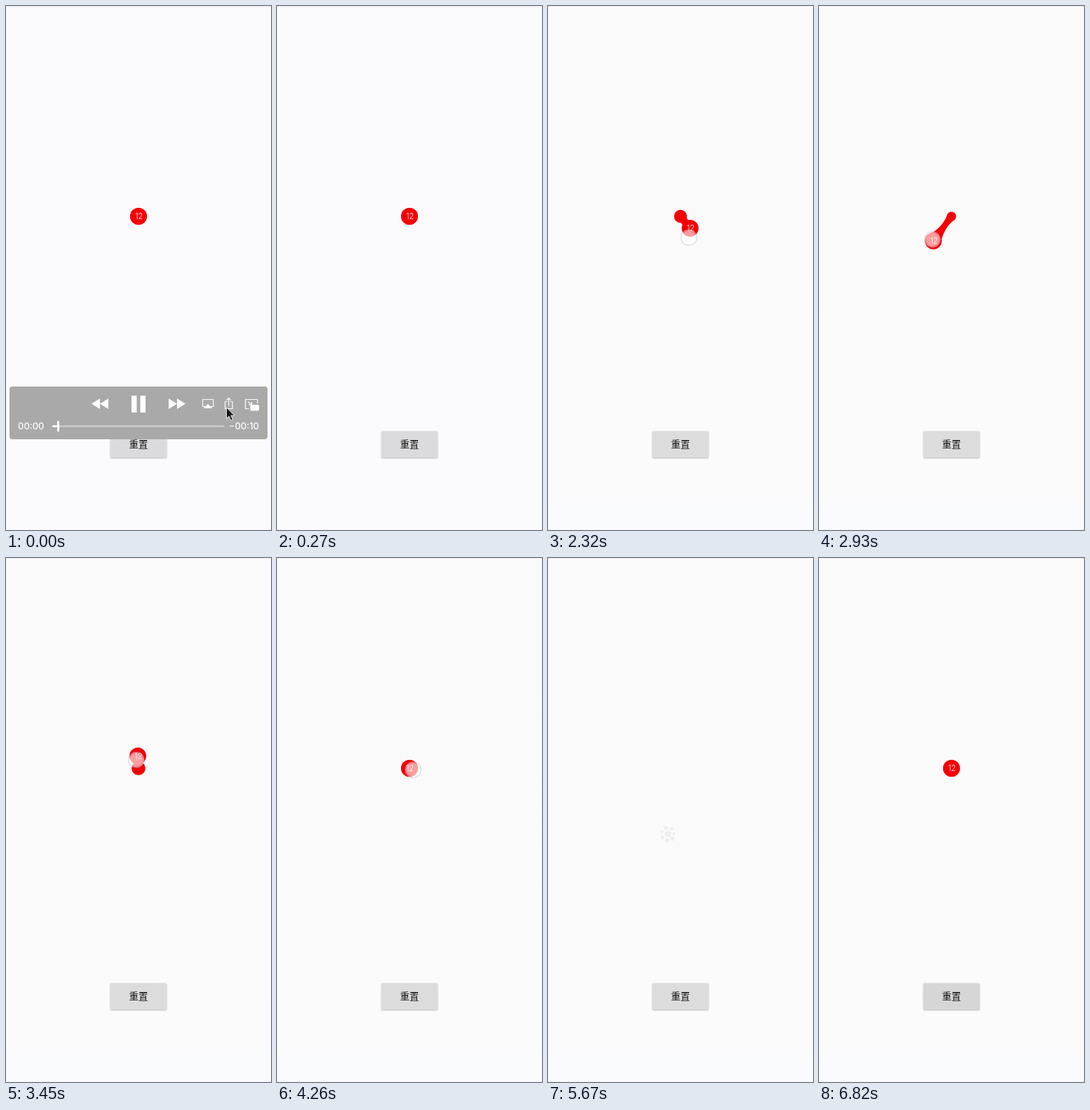
Write an HTML page that moves like this. It is 378 by 745 pixels and loops after 8.53 s.

```html
<!DOCTYPE html>
<html lang="zh">
<head>
<meta charset="utf-8">
<title>Drag bubble</title>
<style>
html, body { margin: 0; width: 100%; height: 100%; overflow: hidden; background: #fbfbfe; }
svg { display: block; width: 378px; height: 745px; }
text { font-family: Inter, Roboto, sans-serif; }
.label { font: 13.5px "Noto Sans CJK SC", "Noto Sans CJK", sans-serif; fill: #111; }
.time { font-size: 13px; font-weight: 500; fill: #fff; }
.line { fill: none; stroke: #fff; stroke-width: 1.2; }
#button { filter: drop-shadow(0 1px 1.2px rgba(0, 0, 0, .27)); }
</style>
</head>
<body>
<svg viewBox="0 0 378 745">
  <defs>
    <linearGradient id="page" x2="0" y2="1">
      <stop offset="0" stop-color="#fafafa"/>
      <stop offset=".84" stop-color="#fbfbfb"/>
      <stop offset=".93" stop-color="#fbfbfc"/>
      <stop offset=".96" stop-color="#fafbfe"/>
    </linearGradient>
    <linearGradient id="edge" x2="0" y2="1">
      <stop offset="0" stop-color="#ededef"/>
      <stop offset="1" stop-color="#fbfbfe"/>
    </linearGradient>
  </defs>

  <rect width="378" height="745" fill="#fbfbfe"/>
  <rect width="378" height="3" fill="url(#edge)"/>
  <g id="neutral">
    <rect width="378" height="745" fill="url(#page)"/>
    <rect width="378" height="1" fill="#f0f0f0"/>
  </g>

  <rect id="button" x="149" y="604.5" width="80" height="37.5" rx="1"/>
  <text class="label" x="175.5" y="627.5">重置</text>

  <g id="bubble" fill="#f50005">
    <circle id="anchor" cx="189" cy="299"/>
    <path id="neck"/>
    <g id="ball">
      <circle r="12"/>
      <text x=".8" y="4" font-size="11" font-weight="300" text-anchor="middle" fill="#fff">12</text>
    </g>
  </g>

  <g id="burst" fill="#e6e6e6"></g>

  <g id="touch">
    <circle r="9.3" fill="#fff" fill-opacity=".62"/>
    <circle r="10.2" fill="none" stroke="#fff" stroke-opacity=".5" stroke-width="1.8"/>
    <circle r="11.4" fill="none" stroke="#8f94bd" stroke-opacity=".5" stroke-width=".9"/>
  </g>

  <g id="player">
    <rect x="5" y="541" width="368" height="75" rx="4" fill="#a9a9aa"/>
    <g fill="#fff">
      <path d="M134 558v15l-12-7.5zM146 558v15l-12-7.5zM232 558v15l12-7.5zM244 558v15l12-7.5z"/>
      <path d="M179 554h7.5v24H179zM191.5 554h7.5v24h-7.5z"/>
      <path d="M288 565.5l6.5 6.5h-13z"/>
      <rect x="348.5" y="567" width="12.5" height="8.5" rx="1.5"/>
      <rect x="66" y="596.2" width="246" height="2.6" rx="1.3" fill="#cbcbcc"/>
      <rect x="66" y="596.2" width="8" height="2.6" rx="1.3"/>
      <rect x="73" y="590" width="3" height="15" rx="1"/>
    </g>
    <path class="line" d="M284 569.5h-3.4v-10h15v10H292.200M315.500 562.500h-3v10h10.500v-10h-3M317.700 568.500v-11M314.700 560.300l3-3 3 3M346.500 572.500h-5v-13h17.300v5.500M345 562.500l5.500 4.500M350.500 563v4h-4.500"/>
    <text class="time" x="17" y="602">00:00</text>
    <text class="time" x="361" y="602" text-anchor="end">−00:10</text>
    <path d="M314.500 571v15.500l3.600-3.300 2.700 6.100 2.700-1.200-2.700-5.900h5z" fill="#111" stroke="#fff" stroke-width=".9"/>
  </g>
</svg>

<script>
const LOOP = 8530, STEP = 87, R = 12, REACH = 72;
const HOME = [189, 299];
const $ = id => document.getElementById(id);
const set = (id, attrs) => {
  for (const k in attrs) $(id).setAttribute(k, attrs[k]);
};
const show = (id, on) => set(id, { opacity: +on });
const place = (id, [x, y]) => set(id, { transform: `translate(${x} ${y})` });

// Finger paths: step, x, y
const swirl = [
  [0, 189, 299], [1.3, 183, 288], [2.5, 191, 279], [4, 202, 306], [5, 201, 329],
  [7, 186, 334], [9, 173, 334], [12, 162, 332], [14, 167, 309], [16, 181, 281],
  [17, 188, 279], [18, 186, 287], [19, 180, 294]
];
const pull = [[0, 194, 301], [1, 196, 309], [3, 191, 342], [5, 178, 377], [7, 171, 394]];

// Smooth curve through the points
function along(pts, s) {
  const last = pts.length - 1;
  if (s <= 0) return pts[0].slice(1);
  if (s >= pts[last][0]) return pts[last].slice(1);
  const i = pts.findIndex(p => p[0] > s) - 1;
  const a = pts[i], b = pts[i + 1], h = b[0] - a[0], u = (s - a[0]) / h;
  const slope = (j, k) => {
    const p = pts[Math.max(j - 1, 0)], n = pts[Math.min(j + 1, last)];
    return (n[k] - p[k]) / (n[0] - p[0]);
  };
  return [1, 2].map(k =>
    a[k] * (1 + 2 * u) * (1 - u) ** 2 + b[k] * u * u * (3 - 2 * u) +
    h * slope(i, k) * u * (1 - u) ** 2 - h * slope(i + 1, k) * u * u * (1 - u));
}

const mix = (a, b, u) => a.map((v, i) => v + (b[i] - v) * u);
const overshoot = u => (u - 1) ** 2 * (6 * (u - 1) + 5) + 1;
const stepAt = (t, from) => Math.floor((t - from) / STEP + .12);

function drawBubble(pos) {
  const [fx, fy] = HOME, [x, y] = pos;
  const d = Math.hypot(x - fx, y - fy);
  const joined = d < REACH, r = R - d / 8;
  place("ball", pos);
  set("anchor", { r: joined ? r : 0 });
  if (!joined || d < 1) return set("neck", { d: "" });
  const nx = -(y - fy) / d, ny = (x - fx) / d;
  const mid = `Q${(x + fx) / 2} ${(y + fy) / 2} `;
  set("neck", {
    d: `M${fx + r * nx} ${fy + r * ny}${mid}${x + R * nx} ${y + R * ny}` +
       `L${x - R * nx} ${y - R * ny}${mid}${fx - r * nx} ${fy - r * ny}Z`
  });
}

function drawBurst(k) {
  const spread = [4.5, 6.5, 8, 9][k], size = [5.5, 4.6, 3.8, 3][k];
  let dots = `<circle r="${[8, 6.5, 5.4, 4.5][k]}"/>`;
  for (let i = 0; i < 7; i++) {
    const a = i * Math.PI * 2 / 7 + 1.7;
    dots += `<circle cx="${spread * Math.cos(a)}" cy="${spread * Math.sin(a)}" r="${size - i % 3 * .5}"/>`;
  }
  $("burst").innerHTML = dots;
  place("burst", [171, 392.5]);
  set("burst", { opacity: [1, .9, .8, .6][k] });
}

function render(t) {
  let pos = HOME, finger = null;
  if (t >= 1890 && t < 4255) {
    const s = stepAt(t, 1890);
    if (s < 20) {
      finger = along(swirl, s);
      pos = along(swirl, s - .6);
    } else if (s === 20) {
      pos = mix(along(swirl, 19), HOME, overshoot(STEP / 200));
    }
  } else if (t >= 4255 && t < 5400) {
    const s = Math.min(stepAt(t, 4260), 8);
    finger = along(pull, s);
    pos = s < 1 ? HOME : along(pull, s < 7 ? s - .4 : s);
  } else if (t >= 6560 && t < 6730) {
    finger = [189, 623];
  }

  const gone = t >= 5400 && t < 6730;
  show("bubble", !gone);
  if (!gone) drawBubble(pos);

  const bursting = t >= 5400 && t < 6560;
  if (bursting) drawBurst(Math.min(stepAt(t, 5400), 3));
  else show("burst", false);

  show("touch", finger);
  set("touch", { opacity: finger ? 1 : 0 });
  if (finger) place("touch", finger);

  set("player", { opacity: Math.max(0, 1 - Math.floor(t / 90) / 3) });
  show("neutral", t >= 1890);
  set("button", { fill: t >= 6560 ? "#d6d6d6" : t >= 1890 ? "#dcdcdc" : "#dbdbdd" });
}

let start;
function tick(now) {
  start ??= now;
  render((now - start) % LOOP);
  requestAnimationFrame(tick);
}
render(0);
requestAnimationFrame(tick);
</script>
</body>
</html>
```
